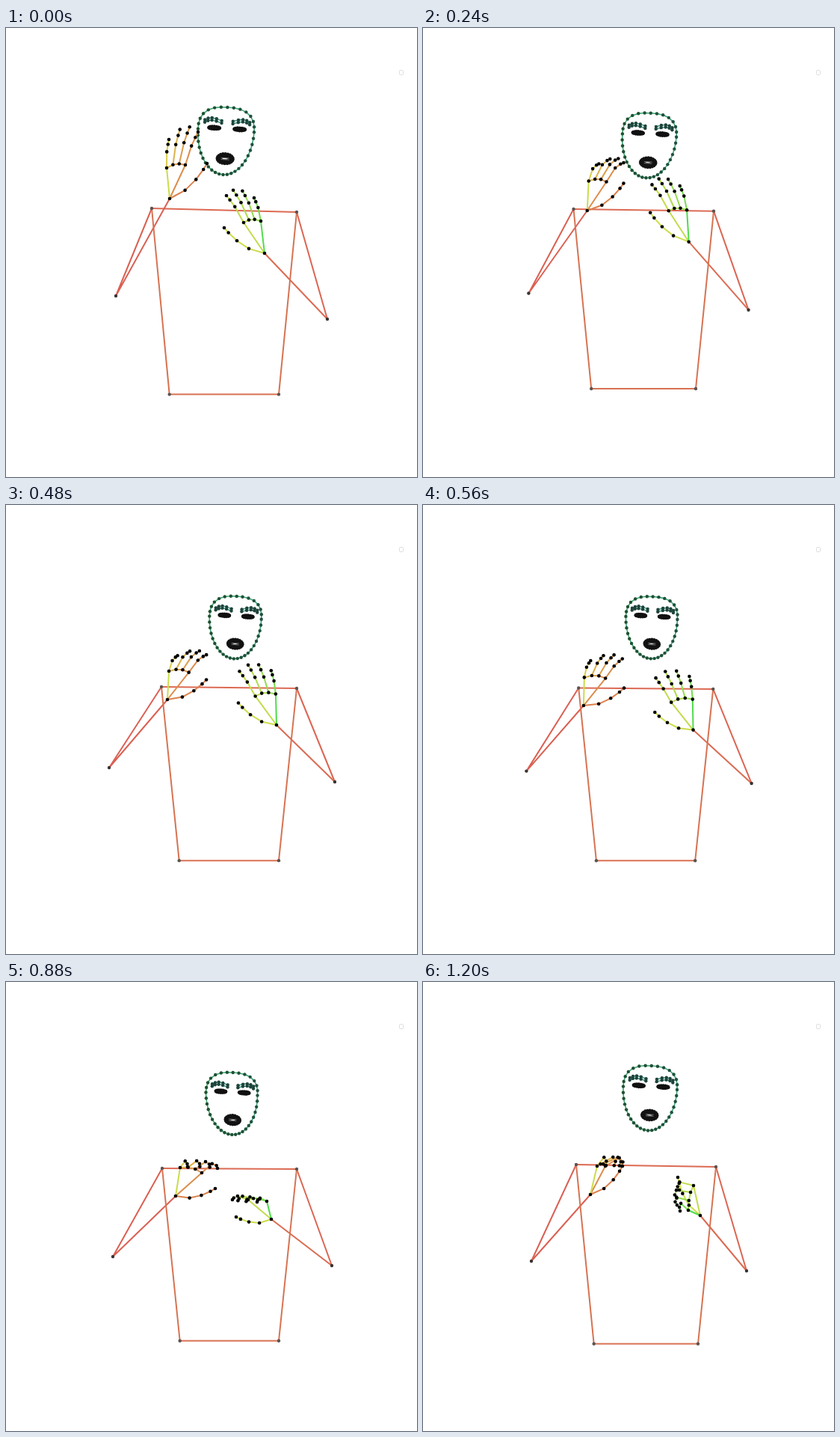
Recreate the animation shown at these times as an HTML page with a canvas. Size 550x600 px, loop 1280 ms.

```html
<!DOCTYPE html>
<html lang="en">
<head>
<meta charset="utf-8">
<title>Pose skeleton</title>
<style>
html, body { margin: 0; width: 100%; height: 100%; overflow: hidden; background: #fff; }
canvas { display: block; }
</style>
</head>
<body>
<canvas id="stage" width="550" height="600"></canvas>
<script>
const ctx = document.getElementById('stage').getContext('2d');
const LOOP = 1280, STEP = 80;
const { PI, sin, cos, abs, hypot } = Math;

// Time, then x,y of: shoulders, elbows, wrists (left, right), top of head.
const body = [
  [0,    195,241, 389,246, 147,358, 430,389, 219,228, 346,301, 294.5,106],
  [160,  198,242, 388,245.5, 144,359, 433,383, 220,241, 352,295, 299.5,110],
  [320,  205,242, 390,244, 139,350, 438,371, 219,247, 359,279, 306,117.5],
  [480,  208,243, 389,245, 138,351, 440,370, 216,260, 362,294, 307,122],
  [720,  208,248, 387,248, 140,366, 438,377, 215,283, 359,312, 303,122],
  [880,  209,249, 389,250, 143,367, 436,379, 227,286, 355,317, 302,121],
  [1200, 205,244, 392,247, 145,373, 433,386, 224,284, 371,312, 304,112]
];

// Time, then from the wrist: thumb tip, index knuckle and tip, pinky knuckle and tip; last the curl.
const leftHand = {
  side: 1, hue: k => 22 + 4 * k + k * k,
  keys: [
    [0,    50,-47, 21,-45, 38,-89, -4,-41, -1,-79, 1.5],
    [320,  49,-33, 27,-37, 51,-59, 3,-39, 18,-59, 4],
    [720,  57,-17, 31,-36, 52,-63, 0,-37, 4,-59, 1.5],
    [880,  53,-10, 35,-31, 56,-37, 6,-38, 16,-39, 8],
    [1200, 43,-38, 20,-38, 42,-38, 9,-38, 21,-39, 11]
  ]
};
const rightHand = {
  side: -1, hue: k => 66 + 4 * k + 1.3 * k * k,
  keys: [
    [0,    -54,-34, -28,-41, -51,-77, -5,-43, -14,-74, 1.5],
    [320,  -51,-38, -27,-41, -49,-75, -2,-42, -11,-74, 1.5],
    [720,  -51,-12, -31,-33, -51,-60, -1,-38, -4,-63, 1],
    [880,  -47,-3, -31,-26, -52,-26, -6,-24, -19,-23, 5],
    [1200, -30,-51, -9,-40, -28,-34, -16,-7, -27,-6, 10]
  ]
};

const range = (n, f) => Array.from({ length: n }, (_, i) => f(i));
const add = (a, b, k = 1) => [a[0] + b[0] * k, a[1] + b[1] * k];
const sub = (a, b) => add(a, b, -1);
const mix = (a, b, k) => add(a, sub(b, a), k);

function pairs(flat) {
  return range(flat.length >> 1, i => [flat[2 * i], flat[2 * i + 1]]);
}

// Smooth curve through unevenly spaced key rows.
function at(keys, t) {
  const last = keys.length - 1;
  let k = 0;
  while (k < last - 1 && t >= keys[k + 1][0]) k++;
  const span = keys[k + 1][0] - keys[k][0];
  const s = (t - keys[k][0]) / span;
  const slope = (i, c) => {
    const a = keys[Math.max(i - 1, 0)], b = keys[Math.min(i + 1, last)];
    return (b[c] - a[c]) / (b[0] - a[0]) * span;
  };
  return keys[k].map((p, c) =>
    p * (1 + 2 * s) * (1 - s) ** 2 + keys[k + 1][c] * s * s * (3 - 2 * s)
    + slope(k, c) * s * (1 - s) ** 2 - slope(k + 1, c) * s * s * (1 - s)
  ).slice(1);
}

function line(points, color, width = 2) {
  ctx.strokeStyle = color;
  ctx.lineWidth = width;
  ctx.beginPath();
  points.forEach(p => ctx.lineTo(...p));
  ctx.stroke();
}

function dots(points, color, r = 2.3) {
  ctx.fillStyle = color;
  for (const [x, y] of points) {
    ctx.beginPath();
    ctx.arc(x, y, r, 0, 2 * PI);
    ctx.fill();
  }
}

function drawTorso(sl, sr, el, er, wl, wr) {
  // The hips follow the shoulders and drop as the body comes nearer.
  const hipY = (sl[1] + sr[1]) / 2 + 230 + 1.15 * (sr[0] - sl[0] - 180);
  const hl = [sl[0] + 23.7, hipY], hr = [sr[0] - 24, hipY];
  line([sl, sr], '#dc6a53');
  line([sl, el, wl], '#da6154');
  line([sr, er], '#db6653');
  line([er, wr], '#db6b52');
  line([sl, hl], '#d67352');
  line([sr, hr], '#d67352');
  line([hl, hr], '#d97152');
  dots([sl, sr, hl, hr], '#5c5350', 2.2);
  dots([el, er], '#3a3332', 2.2);
}

// Points beside the chord a-b, each given as [share of its length, offset in px].
function bend(a, b, side, steps) {
  const d = sub(b, a), len = hypot(...d) || 1;
  const normal = [side * d[1] / len, -side * d[0] / len];
  return steps.map(([u, off]) => add(add(a, d, u), normal, off));
}

function drawHand({ side, hue, keys }, wrist, t) {
  const values = at(keys, t), curl = values.pop();
  const [thumbTip, indexBase, indexTip, pinkyBase, pinkyTip] = pairs(values).map(p => add(wrist, p));
  const color = k => `hsl(${hue(k)} 67% 58%)`;

  const palm = sub(mix(indexBase, pinkyBase, .5), wrist);
  const reach = mix(sub(indexTip, indexBase), sub(pinkyTip, pinkyBase), .5);
  const thumb = bend(wrist, thumbTip, -side, [[.33, 6], [.63, 5.5], [.87, 2.5], [1, 0]]);
  const fingers = range(4, i => {
    const u = i / 3 + (i % 3 ? .02 : 0), inner = i % 3 ? 1 : 0;
    const base = add(mix(indexBase, pinkyBase, u), palm, inner * 3 / hypot(...palm));
    const tip = add(mix(indexTip, pinkyTip, u), reach, inner * .25);
    return [base, ...bend(base, tip, side,
      [[.52 + .03 * curl, curl], [.79 + .025 * curl, curl * .5], [1, 0]])];
  });

  const all = [thumb, ...fingers];
  line([wrist, thumb[0]], color(0));
  line([wrist, indexBase], color(1));
  line([wrist, pinkyBase], color(5));
  for (let i = 1; i < 4; i++) line([all[i][0], all[i + 1][0]], color(i));
  all.forEach((f, i) => line(f, color(i)));
  dots([wrist, ...all.flat()], '#000');
}

// Head shape around the cheek line: squarish above, elliptic below.
const outline = range(36, i => {
  const a = i < 22 ? i * PI / 22 : PI + (i - 22) * PI / 14;
  const c = cos(a), s = sin(a), n = s < 0 ? 2.6 : 2;
  const r = (abs(c) ** n + abs(s) ** n) ** (-1 / n);
  return [37.5 * r * c, (s < 0 ? 31 : 59) * r * s];
});
const ellipse = (cx, cy, rx, ry, n) =>
  range(n, i => [cx + rx * cos(2 * PI * i / n), cy + ry * sin(2 * PI * i / n)]);

function drawFace(top, scale, t) {
  const roll = .06, turn = .9 - 1.8 * cos(2 * PI * (t - 170) / LOOP);
  const place = ([x, y]) => {
    const px = x + turn * Math.max(0, y) / 40;
    return [top[0] + scale * (px - y * roll), top[1] + scale * (31 + y + px * roll)];
  };
  const head = outline.map(place);
  line([...head, head[0]], '#3ba574', 1.6);
  head.forEach((p, i) => dots([p], `hsl(${149 + outline[i][0] * .3} 44% 22%)`, 2.2));

  for (const side of [-1, 1]) {
    const ex = 1 + 17 * side, ey = -2.7;
    for (const lift of [10, 6.8]) {
      const brow = range(5, i => {
        const u = i / 4;
        return place([ex + side * (22.5 * u * (1.35 - .35 * u) - 9.5), ey - lift - 3.2 * sin(PI * u)]);
      });
      line(brow, '#3b9580', 1.5);
      dots(brow, '#1f443b', 2.2);
    }
    dots(ellipse(ex, ey, 7.5, 2, 16).map(place), '#111', 2);
    line([[ex - 6, ey], [ex + 6, ey]].map(place), '#111', 2);
  }

  const mx = 1.2, my = 37.6;
  for (const k of [1, .82, .64]) dots(ellipse(mx, my, 10.6 * k, 6.6 * k * k, 20).map(place), '#131313', 2.1);
  for (const y of [-1, 1.2]) line([[mx - 5.5, my + y], [mx + 5.5, my + y]].map(place), '#999', .7);
}

function drawLegend() {
  ctx.strokeStyle = '#ddd';
  ctx.lineWidth = 1;
  ctx.beginPath();
  ctx.roundRect(526.5, 56.5, 5, 6, 1);
  ctx.stroke();
}

function draw(t) {
  ctx.fillStyle = '#fff';
  ctx.fillRect(0, 0, 550, 600);
  ctx.lineJoin = 'round';
  const [sl, sr, el, er, wl, wr, top] = pairs(at(body, t));
  const scale = (69 + .43 * (sr[0] - sl[0] - 180)) / 75;
  drawTorso(sl, sr, el, er, wl, wr);
  drawFace(top, scale, t);
  drawHand(leftHand, wl, t);
  drawHand(rightHand, wr, t);
  drawLegend();
}

const start = performance.now();
function tick() {
  const t = (performance.now() - start) % LOOP;
  draw(Math.floor(t / STEP) * STEP);
  requestAnimationFrame(tick);
}
tick();
</script>
</body>
</html>
```
